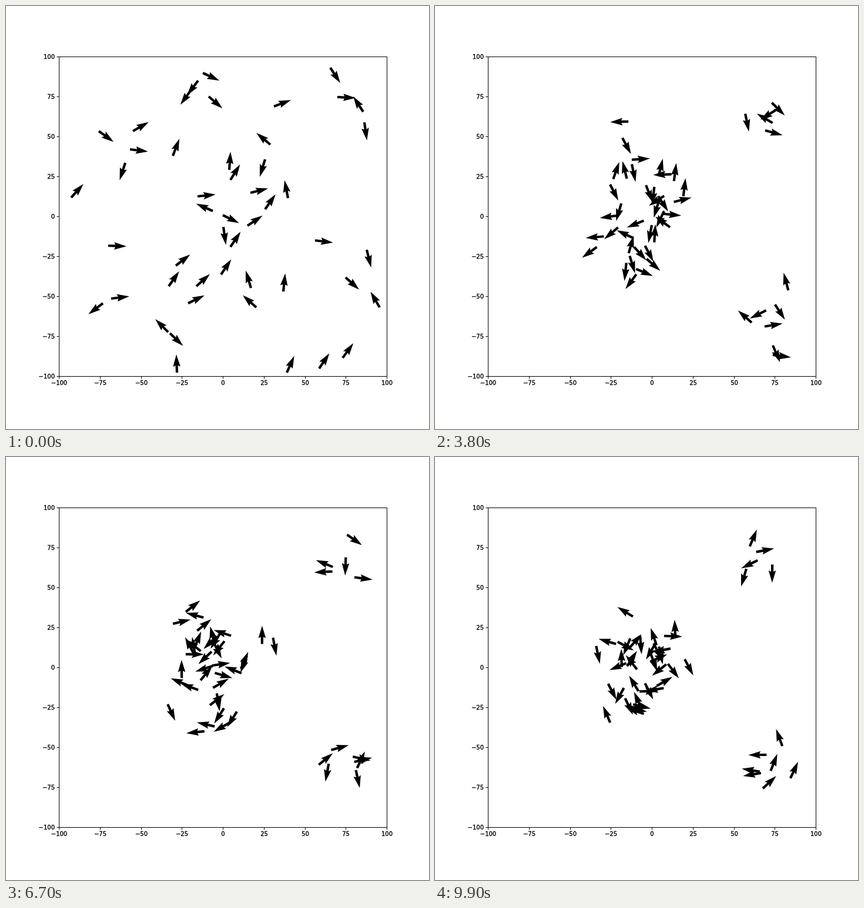
An HTML page for the animation above (10000 ms loop, 720x720 px).

```html
<!DOCTYPE html>
<html lang="en">
<head>
<meta charset="utf-8">
<title>Swarm</title>
<style>
  html, body { margin: 0; width: 100%; height: 100%; overflow: hidden; background: #fff; }
  svg { display: block; width: 720px; height: 720px; }
  text { font: 10px "DejaVu Sans", sans-serif; stroke: #000; stroke-width: .35px; }
  .x { text-anchor: middle; }
  .y { text-anchor: end; }
  .axis { fill: none; stroke: #000; stroke-width: 1; }
</style>
</head>
<body>
<svg viewBox="0 0 720 720">
  <defs>
    <path id="arrow" d="M0-2.1H12.2L10.1-6.3L31 0L10.1 6.3L12.2 2.1H0Z"/>
    <clipPath id="plot"><rect x="90" y="86" width="559" height="545"/></clipPath>
  </defs>
  <g id="swarm" clip-path="url(#plot)"></g>
  <g id="axes"><rect class="axis" x="90.5" y="86.5" width="558" height="544"/></g>
</svg>
<script>
const STEP = 100, COUNT = 100, SPEED = 8.2, MAX_TURN = 0.5;

// Starting tail x, tail y and heading in degrees
const start = [
  335,114,25, 327,127,127, 315,143,126, 345,154,41, 552,105,57, 564,155,3, 608,180,-123,
  610,198,82, 456,171,-21, 158,213,36, 216,213,-30, 211,244,7, 203,267,108, 284,255,-69,
  450,236,-140, 441,261,107, 380,279,-86, 382,296,-58, 326,324,-6, 416,318,-14, 480,327,-101,
  441,346,-55, 111,326,-48, 352,349,-156, 369,356,26, 411,374,-34, 370,376,82, 382,410,-56,
  174,408,2, 526,399,7, 614,415,76, 578,462,42, 636,513,-120, 289,442,-38, 277,477,-55,
  324,477,-42, 366,457,-56, 310,506,-26, 417,480,-107, 426,513,-138, 472,486,-84, 165,506,143,
  179,498,-7, 276,555,-135, 279,557,44, 291,624,-92, 478,624,-66, 533,617,-56, 573,599,-54
];

let seed = 11;
function random() {
  seed = (seed * 1664525 + 1013904223) % 4294967296;
  return seed / 4294967296;
}
const spread = size => (random() * 2 - 1) * size;
const clamp = (v, lo, hi) => Math.min(hi, Math.max(lo, v));
const mix = (a, b, k) => a + (b - a) * k;

function around(cx, cy, radius, angle) {
  const r = radius * Math.sqrt(random());
  return { x: cx + r * Math.cos(angle), y: cy + r * Math.sin(angle) };
}

// Two small flocks keep one home; the large one gathers on a bow, then in a disc
function makeAgent(x, y, degrees) {
  const agent = { x, y, angle: degrees * Math.PI / 180 };
  const anyAngle = random() * 2 * Math.PI;
  if (x > 450 && y < 230) {
    agent.early = agent.late = around(575, 176, 30, anyAngle);
  } else if (x > 475 && y > 390) {
    agent.early = agent.late = around(577, 530, 30, anyAngle);
  } else {
    const bowY = 340 + (y - 345) * 0.6;
    agent.early = { x: 340 + 45 * Math.cos((bowY - 340) / 120 * Math.PI) + spread(42), y: bowY };
    agent.late = around(350, 352, 82, Math.atan2(y - 352, x - 350));
  }
  return agent;
}

function steer(agent, step) {
  const k = clamp((step - 12) / 48, 0, 1);
  const dx = mix(agent.early.x, agent.late.x, k) - agent.x;
  const dy = mix(agent.early.y, agent.late.y, k) - agent.y;
  const off = Math.atan2(dy, dx) - agent.angle;
  const turn = Math.atan2(Math.sin(off), Math.cos(off));
  agent.angle += clamp(turn, -MAX_TURN, MAX_TURN) + spread(0.4);
  agent.x += SPEED * Math.cos(agent.angle);
  agent.y += SPEED * Math.sin(agent.angle);
}

const pose = a =>
  `translate(${a.x.toFixed(2)} ${a.y.toFixed(2)}) rotate(${(a.angle * 180 / Math.PI).toFixed(2)})`;

function add(parent, tag, attrs, text) {
  const el = document.createElementNS("http://www.w3.org/2000/svg", tag);
  for (const name in attrs) el.setAttribute(name, attrs[name]);
  if (text) el.textContent = text;
  return parent.appendChild(el);
}

const axes = document.getElementById("axes");
for (let i = 0; i <= 8; i++) {
  const value = i * 25 - 100;
  const label = String(value).replace("-", "\u2212");
  const x = Math.round(90 + i * 69.75) + 0.5;
  const y = Math.round(630 - i * 67.95) + 0.5;
  add(axes, "path", { class: "axis", d: `M${x} 631v3.5M90 ${y}h-3.5` });
  add(axes, "text", { class: "x", x, y: 645 }, label);
  add(axes, "text", { class: "y", x: 83, y: y + 3.5 }, label);
}

const agents = [];
for (let i = 0; i < start.length; i += 3) agents.push(makeAgent(...start.slice(i, i + 3)));
const arrows = agents.map(() => add(document.getElementById("swarm"), "use", { href: "#arrow" }));

const poses = [agents.map(pose)];
for (let step = 1; step < COUNT; step++) {
  agents.forEach(a => steer(a, step));
  poses.push(agents.map(pose));
}

let shown = -1;
function draw() {
  const now = Math.floor(performance.now() / STEP) % COUNT;
  if (now !== shown) {
    shown = now;
    arrows.forEach((el, i) => el.setAttribute("transform", poses[now][i]));
  }
  requestAnimationFrame(draw);
}
draw();
</script>
</body>
</html>
```
